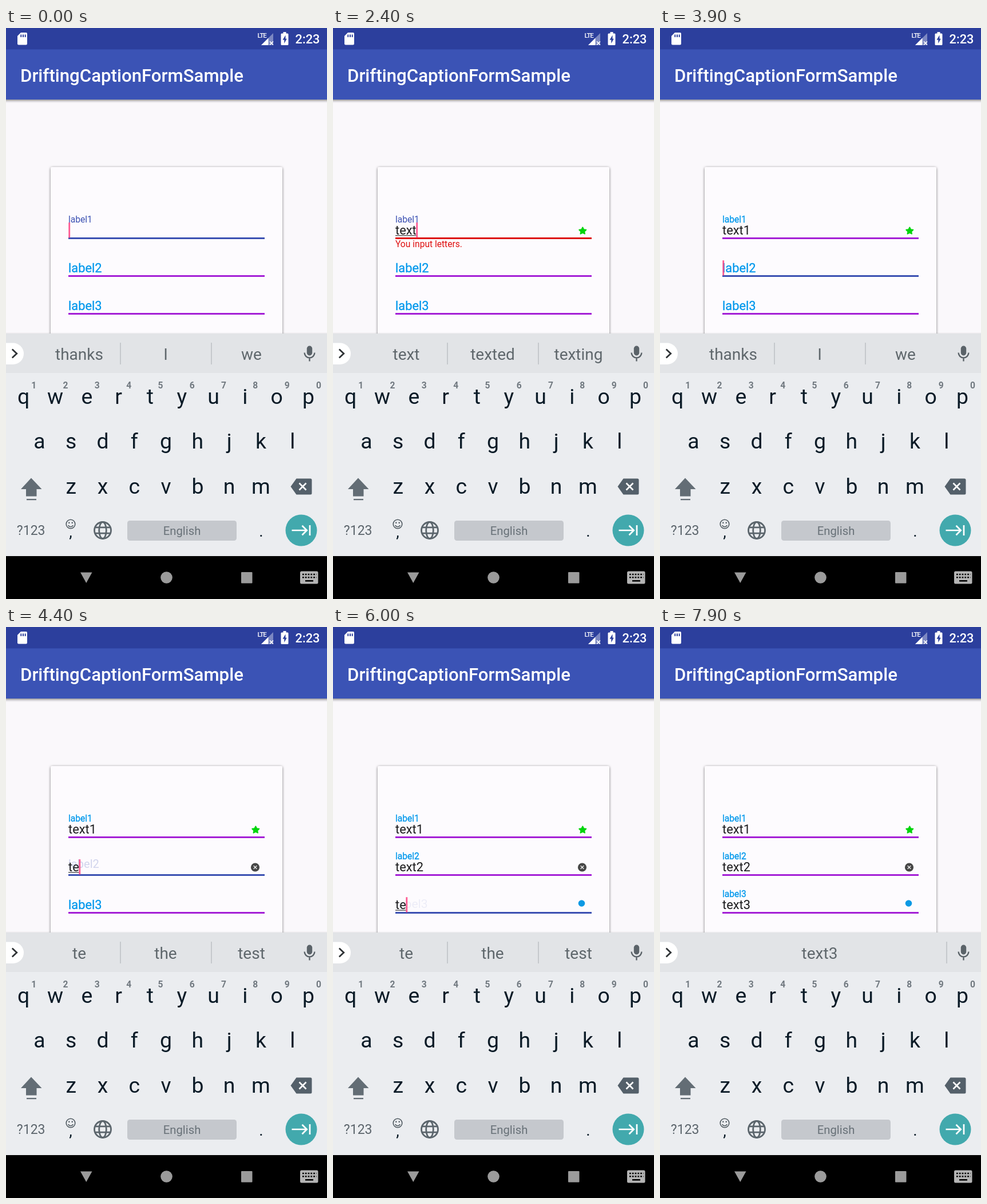
Recreate the animation shown at these times as an HTML page. Size 561 px wide and 998 px high, loop 8 s.

```html
<!DOCTYPE html>
<html lang="en">
<head>
<meta charset="utf-8">
<title>Floating labels</title>
<style>
  html, body { margin: 0; width: 100%; height: 100%; overflow: hidden; background: #faf8fb; }
  svg { display: block; width: 100%; height: 100%; font-family: Roboto, sans-serif; }
  .mid { text-anchor: middle; }
  .key { font-size: 37.4px; fill: #0b1b27; }
  .num { font-size: 15.6px; font-weight: 700; fill: #717980; }
  .hint { font-size: 28px; fill: #5f676c; }
  .value { font-size: 21.8px; fill: #1b1b1d; }
  .error { font-size: 15.6px; fill: #df1010; }
</style>
</head>
<body>
<svg id="stage" viewBox="0 0 561 998" xmlns="http://www.w3.org/2000/svg">
  <defs>
    <filter id="barShadow" x="-5%" y="-20%" width="110%" height="150%">
      <feDropShadow dx="0" dy="2" stdDeviation="2.2" flood-color="#000" flood-opacity=".45"/>
    </filter>
    <filter id="cardShadow" x="-5%" y="-5%" width="110%" height="110%">
      <feDropShadow dx="0" dy="1" stdDeviation="2.2" flood-color="#000" flood-opacity=".55"/>
    </filter>
  </defs>

  <rect width="561" height="998" fill="#faf8fb"/>
  <rect x="-10" y="20" width="581" height="105" fill="#3b52b5" filter="url(#barShadow)"/>
  <rect width="561" height="37.4" fill="#2c3f9d"/>
  <text x="25" y="93.7" font-size="31.2" font-weight="500" fill="#fff">DriftingCaptionFormSample</text>

  <!-- status bar -->
  <g fill="#fff">
    <path d="M26 8H35Q37 8 37 10V27.500Q37 29.500 35 29.500H22Q20 29.500 20 27.500V14Z"/>
    <path d="M26.300 11.500V16M30 11.500V16M33.700 11.500V16" stroke="#2c3f9d" stroke-width="2"/>
    <text x="439.500" y="17" font-size="11.500" font-weight="500" letter-spacing="-1.1">LTE</text>
    <path d="M446 30L467 9V30Z" opacity=".38"/>
    <path d="M446 30L458.500 17.500V30Z"/>
    <path d="M461 23.500L467 29.500M467 23.500L461 29.500" stroke="#fff" stroke-width="1.700"/>
    <path d="M484.500 9.500V7H489.500V9.500H492Q493.500 9.500 493.500 11V28.500Q493.500 30 492 30H482Q480.500 30 480.500 28.500V11Q480.500 9.500 482 9.500Z"/>
    <path d="M488.500 12.500L483.500 20.800H486.300V27L490.800 18.700H488.500Z" fill="#2c3f9d"/>
    <text x="505.500" y="27" font-size="21.800" font-weight="500">2:23</text>
  </g>

  <!-- form card -->
  <rect x="78" y="243" width="405" height="340" rx="3" fill="#fdfbfe" filter="url(#cardShadow)"/>
  <g id="form"></g>
  <path id="star" d="M436.300 348.500L438.200 352.200L442.300 352.800L439.300 355.700L440 359.700L436.300 357.800L432.600 359.700L433.300 355.700L430.300 352.800L434.400 352.200Z" fill="#00d50c" stroke="#00d50c" stroke-width="2" stroke-linejoin="round"/>
  <g id="clear">
    <circle cx="435.500" cy="420" r="7.600" fill="#474747"/>
    <path d="M432.700 417.200L438.300 422.800M438.300 417.200L432.700 422.800" stroke="#f4f4f4" stroke-width="1.300"/>
  </g>
  <circle id="dot" cx="434.500" cy="483" r="5.800" fill="#0c99e4"/>
  <rect id="caret" width="2.800" height="26.500" fill="#ff4081" opacity=".85"/>

  <!-- keyboard -->
  <rect y="532.500" width="561" height="2" fill="#000" opacity=".05"/>
  <rect y="534" width="561" height="69" fill="#e2e4e7"/>
  <rect y="603" width="561" height="320" fill="#ebedf0"/>
  <rect x="-30" y="550.500" width="61" height="37.500" rx="18.750" fill="#fff"/>
  <path d="M10.800 561.500L18.800 569L10.800 576.500" fill="none" stroke="#2f3336" stroke-width="2.800"/>
  <g fill="none" stroke="#5b6369" stroke-width="2.400">
    <rect x="525.800" y="555.500" width="9.400" height="17" rx="4.700" fill="#5b6369" stroke="none"/>
    <path d="M521.600 567.500A8.900 8.900 0 0 0 539.400 567.500M530.500 576V582.500"/>
  </g>
  <g id="bar"></g>
  <g id="keys"></g>
  <path d="M44 786.500L62.500 806H53.500V818.500H35V806H26ZM36 823H53V825.200H36Z" fill="#636d75"/>
  <path d="M507.500 787.500H532Q534.500 787.500 534.500 790V813Q534.500 815.500 532 815.500H507.500L497.500 801.500Z" fill="#54606a"/>
  <path d="M512.500 795.500L524.500 807.500M524.500 795.500L512.500 807.500" stroke="#fff" stroke-width="2.700"/>
  <text class="mid" x="43.700" y="886.300" font-size="23" fill="#5c656c">?123</text>
  <g fill="none" stroke="#4e585f" stroke-width="1.600">
    <circle cx="113" cy="867" r="7.800"/>
    <path d="M108.800 869A4.600 4.600 0 0 0 117.200 869"/>
    <path d="M110.300 863.500V866M115.700 863.500V866" stroke-width="2"/>
  </g>
  <text class="mid" x="113" y="890" font-size="28" fill="#0b1b27">,</text>
  <g fill="none" stroke="#5b656c" stroke-width="2.800">
    <circle cx="169" cy="878" r="14.500"/>
    <ellipse cx="169" cy="878" rx="6.300" ry="14.500"/>
    <path d="M156 872.800H182M156 883.200H182"/>
  </g>
  <rect x="212" y="861" width="191" height="35" rx="4.500" fill="#c5c8cd"/>
  <text class="mid" x="307.500" y="885.800" font-size="20.300" fill="#687178">English</text>
  <text class="mid" x="446" y="888.500" font-size="28" fill="#0b1b27">.</text>
  <circle cx="516" cy="878" r="27.500" fill="#42a9ad"/>
  <path d="M499.500 878H525M517.500 869.800L525.700 878L517.500 886.200M531 869V887" fill="none" stroke="#fff" stroke-width="2.700"/>

  <!-- navigation bar -->
  <rect y="923" width="561" height="75" fill="#000"/>
  <g fill="#9b9b9b">
    <path d="M130 951.500H150.500L140.250 970Z"/>
    <circle cx="280.500" cy="960.500" r="10.300"/>
    <rect x="411" y="951" width="19.500" height="19.500" rx="1"/>
  </g>
  <rect x="514" y="949.500" width="31.500" height="22" rx="2.500" fill="#b4b4b4"/>
  <g stroke="#000" stroke-width="2.600">
    <path d="M518 955H542.500M518 960.200H542.500" stroke-dasharray="2.700 2.100"/>
    <path d="M523 966.300H537"/>
  </g>
</svg>
<script>
const LOOP = 8000, STEP = 66.1, LEFT = 109, BLINK = 500, PITCH = 55.3, MIDDLE = 279.6;
const BLUE = '#3b50b2', SKY = '#0098ec', PURPLE = '#a41fd6', RED = '#dd1414';

// [time, focused field, its text]
const EVENTS = [
  [-300, 0, ''], [1800, 0, 't'], [2100, 0, 'te'], [2250, 0, 'tex'], [2400, 0, 'text'], [2800, 0, 'text1'],
  [3700, 1, ''], [4100, 1, 't'], [4300, 1, 'te'], [4500, 1, 'tex'], [4700, 1, 'text'], [5100, 1, 'text2'],
  [5500, 2, ''], [5800, 2, 't'], [6000, 2, 'te'], [6200, 2, 'tex'], [7100, 2, 'text'], [7600, 2, 'text3'],
  [7900, 3, '']
];
const LIFT_START = [-1000, 4294, 5934], LIFT_TIME = 300;
const WORDS = {
  '': ['thanks', 'I', 'we'],
  t: ['t', 'the', 'to'],
  te: ['te', 'the', 'test'],
  tex: ['tex', 'text', 'Texas'],
  text: ['text', 'texted', 'texting']
};

const $ = id => document.getElementById(id);
const clamp = x => Math.max(0, Math.min(1, x));
const show = (el, on) => el.setAttribute('visibility', on ? 'visible' : 'hidden');

function set(el, attrs) {
  for (const name in attrs) el.setAttribute(name, attrs[name]);
}
function add(parent, tag, attrs, text = '') {
  const el = document.createElementNS('http://www.w3.org/2000/svg', tag);
  set(el, attrs);
  el.textContent = text;
  parent.append(el);
  return el;
}

['qwertyuiop', 'asdfghjkl', 'zxcvbnm'].forEach((row, r) => {
  [...row].forEach((char, i) => {
    const x = MIDDLE + (i - (row.length - 1) / 2) * PITCH;
    add($('keys'), 'text', { class: 'key mid', x, y: 656.5 + r * 78.5 }, char);
    if (r === 0) add($('keys'), 'text', { class: 'num mid', x: x + 18, y: 629.5 }, (i + 1) % 10);
  });
});

const words = [128, 279, 429].map(x => add($('bar'), 'text', { class: 'hint mid', x, y: 580 }));
const splits = [200, 359, 501].map(x =>
  add($('bar'), 'rect', { x: x - 0.7, y: 550, width: 1.4, height: 38, fill: '#b9bdc1' }));

const fields = ['star', 'clear', 'dot'].map((icon, i) => {
  const y = 361 + i * STEP, form = $('form');
  return {
    y,
    icon: $(icon),
    label: add(form, 'text', { x: LEFT }, 'label' + (i + 1)),
    value: add(form, 'text', { class: 'value', x: LEFT, y }),
    under: add(form, 'rect', { x: LEFT, y: y + 1.2, height: 1.2, fill: '#333' }),
    line: add(form, 'rect', { x: LEFT, y: Math.round(y + 4.6), width: 343, height: 3 })
  };
});
const error = add($('form'), 'text', { class: 'error', x: LEFT, y: 383 }, 'You input letters.');

function drawField(f, i, t, focus, typed) {
  const focused = i === focus;
  const text = focused ? typed : i < focus ? 'text' + (i + 1) : '';
  const failed = i === 0 && focused && /^[a-z]+$/.test(text);
  const raised = i === 0 || text !== '';
  const x = clamp((t - LIFT_START[i]) / LIFT_TIME);
  const lift = raised ? (1 - Math.cos(Math.PI * x)) / 2 : 0;
  const active = focused && raised;

  set(f.label, {
    y: f.y - 21 * lift,
    'font-size': 21.8 - 6.2 * lift,
    fill: active ? BLUE : SKY,
    stroke: active ? 'none' : SKY,
    'stroke-width': 0.3,
    opacity: raised ? Math.pow(lift, 1.2) : 1
  });
  f.value.textContent = text;
  f.line.setAttribute('fill', failed ? RED : focused ? BLUE : PURPLE);
  show(f.icon, text);
  show(f.under, focused && text);
  if (i === 0) error.setAttribute('opacity', failed ? clamp((t - 1750) / 150) : 0);
  if (!focused) return;
  const width = text ? f.value.getComputedTextLength() : 0;
  f.under.setAttribute('width', width);
  set($('caret'), { x: LEFT + width + (text ? -0.3 : 0.3), y: f.y - 21 });
}

function drawWords(typed) {
  const list = WORDS[typed] || ['', typed, ''];
  const single = !WORDS[typed];
  words.forEach((el, i) => { el.textContent = list[i]; });
  splits.forEach((el, i) => show(el, single === (i === 2)));
}

function draw(t) {
  const [start, focus, typed] = EVENTS.filter(e => e[0] <= t).pop();
  fields.forEach((f, i) => drawField(f, i, t, focus, typed));
  show($('caret'), focus < 3 && Math.floor((t - start) / BLINK) % 2 === 0);
  drawWords(focus < 3 ? typed : 'text3');
}

const begin = performance.now();
function tick() {
  draw((performance.now() - begin) % LOOP);
  requestAnimationFrame(tick);
}
tick();
</script>
</body>
</html>
```
